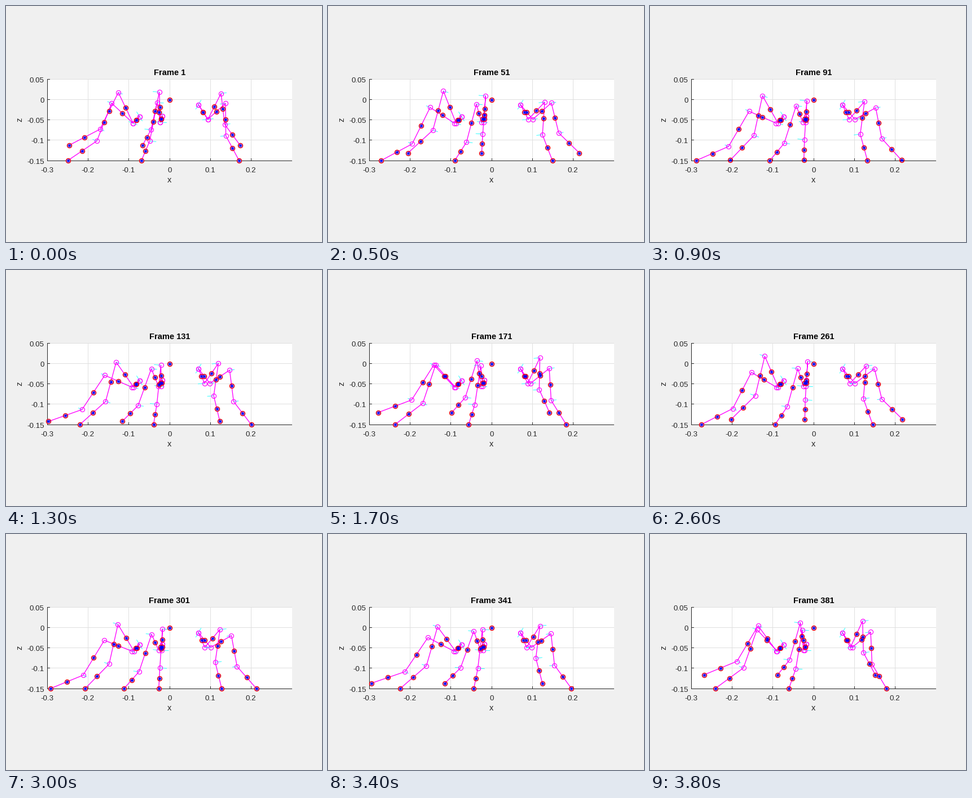
Write a matplotlib script that moves like this. It is 560x420 px and loops after 3.9 s.

```python
import numpy as np
import matplotlib.pyplot as plt
from matplotlib.animation import FuncAnimation

plt.rcParams["font.family"] = "Liberation Sans"
W, H, DPI = 560, 420, 72
STEPS, INTERVAL = 39, 100
HALF_CYCLE = 200            # counts in one swing or one stance
STRIDE, LIFT = 61.5, 27     # pixels
X0, Y0, SCALE = 289.8, 166.5, 723.4
GROUND = 275
DARK, GRID = "#262626", "#dfdfdf"
GAP = np.full(2, np.nan)


class Leg:
    """Home pose of a leg (hip, coxa, knee, tibia, foot) and how it bends."""

    def __init__(self, home, side, reach, slide, tilt, pull):
        self.home = np.array(home, float)
        self.side = side      # way the joint axes point on the first leg
        self.reach = reach    # how far knee and tibia follow the foot
        self.slide = slide    # how far the coxa follows the foot
        self.tilt = tilt      # slope of the knee's path
        self.pull = pull      # sideways pull on the knee when lifted

    def pose(self, d, h):
        """Joints for a foot d pixels ahead of home and h above the ground."""
        r, t, p = self.reach, self.tilt, self.pull
        coxa = (self.slide * d, 0)
        knee = (.33 * r * d + .002 * t * d * d + p * h,
                t * d + .0022 * d * d - .67 * h)
        tibia = (.63 * r * d + .003 * t * d * d + .37 * p * h,
                 .7 * t * d + .0012 * d * d - .75 * h)
        return self.home + [(0, 0), coxa, knee, tibia, (d, -h)]

    def rods(self, pts, sign):
        """Short joint axes, square to the leg's heading."""
        hip, foot = pts[0], pts[-1]
        spread = (foot[0] - hip[0]) / 95
        axis = sign * np.array([12 / np.hypot(1, spread), -6 * self.tilt])
        fan = sign * np.array([(hip[0] - X0) / 11, -8])
        out = [hip, hip + fan, GAP]
        for p in pts[1:4]:
            out += [p, p + axis, GAP]
        return out


LEGS = [
    Leg([(341, 175.5), (357.5, 201.7), (389, 173.3), (389.6, 230.8), (413, GROUND)],
        side=1, reach=1, slide=.17, tilt=.18, pull=-.32),
    Leg([(277, 195.5), (273.3, 206.7), (267.9, 171.7), (254.7, 240.4), (240, GROUND)],
        side=-1, reach=.95, slide=.09, tilt=-.155, pull=.12),
    Leg([(236.5, 196.5), (225, 208.5), (187.2, 172.9), (161, 240.2), (109.5, GROUND)],
        side=1, reach=1.19, slide=.06, tilt=-.46, pull=.41),
]


def foot_offset(u):
    """Swing for u in [0, 1), stance for u in [1, 2)."""
    u %= 2
    if u >= 1:
        return STRIDE * (1.5 - u), 0
    arc = np.sin(np.pi * u) ** 2
    return STRIDE * (u - .5) - 16 * np.sin(2 * np.pi * u) + 2 * arc, LIFT * arc


fig = plt.figure(figsize=(W / DPI, H / DPI), dpi=DPI, facecolor="#f0f0f0")
ax = fig.add_axes([0, 0, 1, 1])
ax.set_xlim(0, W)
ax.set_ylim(H, 0)
ax.axis("off")


def bar(x, y, w, h, color, z):
    """Filled rectangle on whole pixels."""
    ax.add_patch(plt.Rectangle((x, y), w, h, fc=color, ec="none", lw=0,
                               antialiased=False, zorder=z))


def label(x, y, text, size=13.33, color=DARK, **kw):
    return ax.text(x, y, text, size=size, color=color, **kw)


left, top, width, height = 73, 130, 434, 145
bar(left, top, width, height, "white", 0)
for v in (-.3, -.2, -.1, 0, .1, .2):
    x = round(X0 + SCALE * v)
    bar(x, top, 1, height, GRID, 1)
    bar(x, GROUND - 4, 1, 4, DARK, 2)
    label(x, 295.5, f"{v:g}", ha="center")
for v in (.05, 0, -.05, -.1, -.15):
    y = int(Y0 - SCALE * v)
    bar(left, y, width, 1, GRID, 1)
    bar(left, y, 5, 1, DARK, 2)
    label(67.5, y + 6, f"{v:g}", ha="right")
bar(left, top, 1, height, DARK, 2)
bar(left, GROUND, width, 1, DARK, 2)
label(X0, 314, "x", 14.67, ha="center")
label(28, 202, "z", 14.67, rotation=90, rotation_mode="anchor", ha="center")
title = label(X0, 123, "", 14.67, "black", weight="bold", ha="center")


def series(z, **kw):
    art, = ax.plot([], [], zorder=z, **kw)
    art.set_snap(False)
    return art


def ring(z, color, width):
    return series(z, marker="o", ls="none", mfc="none", mec=color, ms=8, mew=width)


rods = series(3, color="cyan", lw=.8)
links = series(4, color="magenta", lw=1.33)
joints = ring(5, "magenta", 1.2)
masses = ring(6, "red", 1.4)
stars = series(7, marker=(8, 2, 0), ls="none", mec="blue", ms=7, mew=.75)


def draw(i):
    n = 1 + 10 * i
    title.set_text(f"Frame {n}")
    axes, path, hinges, dots = [], [], [], [(290, Y0)]
    for leg in LEGS:
        for shift, sign in ((0, leg.side), (1, -leg.side)):
            pts = leg.pose(*foot_offset((n + 99) / HALF_CYCLE + shift))
            axes += leg.rods(pts, sign)
            path += [*pts, GAP]
            hinges += [*pts[:4]]
            dots += [*((pts[1:] + pts[:-1]) / 2), pts[4]]
    for art, data in ((rods, axes), (links, path), (joints, hinges),
                      (masses, dots), (stars, dots)):
        art.set_data(*np.array(data).T)
    return title, rods, links, joints, masses, stars


anim = FuncAnimation(fig, draw, frames=STEPS, interval=INTERVAL,
                     repeat=True, repeat_delay=0)
plt.show()
```
